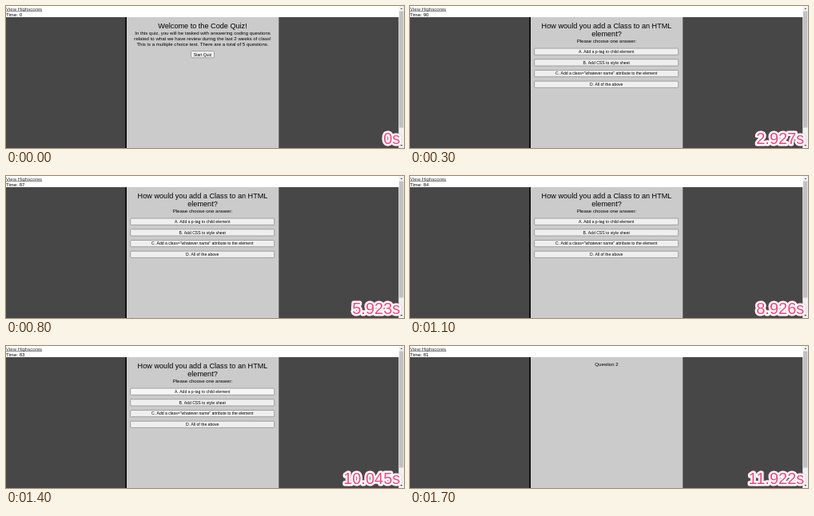
These frames come from a looping animation (498 px wide and 178 px high, 1800 ms). An HTML page with a canvas:

```html
<!DOCTYPE html>
<html lang="en">
<head>
<meta charset="utf-8">
<title>Code Quiz</title>
<style>
html, body { margin: 0; width: 100%; height: 100%; overflow: hidden; background: #fff; }
canvas { display: block; width: 498px; height: 178px; }
</style>
</head>
<body>
<canvas id="stage" width="498" height="178"></canvas>
<script>
const ctx = document.getElementById('stage').getContext('2d');
const FONT = '"Liberation Sans", Arial, sans-serif';
const BODY = 6.09, HEADING = BODY * 1.5, BUTTON = 5.08, CENTER = 246;
const FILL = { idle: '#efefef', hover: '#e3e3e3', active: '#f6f6f6' };
const STEP = 100;

// Each step: stopwatch seconds, countdown, page, pointer state of the main button
const steps = [
  ['0', 0, 'intro', 'idle'],
  ['1.125', 0, 'intro', 'hover'],
  ['1.925', 0, 'question', 'idle'],
  ['2.927', 90, 'question', 'idle'],
  ['3.924', 89, 'question', 'idle'],
  ['4.325', 89, 'question', 'hover'],
  ['4.922', 88, 'question', 'hover'],
  ['5.125', 88, 'question', 'idle'],
  ['5.923', 87, 'question', 'idle'],
  ['6.924', 86, 'question', 'idle'],
  ['7.925', 85, 'question', 'idle'],
  ['8.926', 84, 'question', 'idle'],
  ['9.525', 84, 'question', 'hover'],
  ['9.925', 83, 'question', 'hover'],
  ['10.045', 83, 'question', 'active'],
  ['10.125', 83, 'next', 'idle'],
  ['10.925', 82, 'next', 'idle'],
  ['11.922', 81, 'next', 'idle']
];

const answers = [
  'A. Add a p-tag to child element',
  'B. Add CSS to style sheet',
  'C. Add a class="whatever name" attribute to the element',
  'D. All of the above'
];

function rect(x, y, w, h, color) {
  ctx.fillStyle = color;
  ctx.fillRect(x, y, w, h);
}

function text(str, x, y, size, align = 'center', color = '#000') {
  ctx.font = `${size}px ${FONT}`;
  ctx.textAlign = align;
  ctx.fillStyle = color;
  ctx.fillText(str, x, y);
}

function button(label, x, y, w, state) {
  ctx.beginPath();
  ctx.roundRect(x, y, w, 8.2, 1);
  ctx.fillStyle = FILL[state];
  ctx.fill();
  ctx.lineWidth = 0.6;
  ctx.strokeStyle = state === 'hover' ? '#4f4f4f' : '#767676';
  ctx.stroke();
  text(label, x + w / 2, y + 5.9, BUTTON);
}

const pages = {
  intro(state) {
    text('Welcome to the Code Quiz!', CENTER, 27.9, HEADING);
    [
      'In this quiz, you will be tasked with answering coding questions',
      'related to what we have review during the last 2 weeks of class!',
      'This is a multiple choice test. There are a total of 5 questions.'
    ].forEach((line, i) => text(line, CENTER, 35.8 + i * 7, BODY));
    button('Start Quiz', 231.5, 56.6, 29, state);
  },
  question(state) {
    text('How would you add a Class to an HTML', CENTER, 27.9, HEADING);
    text('element?', CENTER, 38.3, HEADING);
    text('Please choose one answer:', CENTER, 46.2, BODY);
    answers.forEach((label, i) =>
      button(label, 155.7, 53.1 + i * 13.7, 180, i === 0 ? state : 'idle'));
  },
  next() {
    text('Question 2', CENTER, 25.2, BODY);
  }
};

function arrow(y, dir) {
  ctx.beginPath();
  ctx.moveTo(493.3, y);
  ctx.lineTo(496.3, y);
  ctx.lineTo(494.8, y + 1.7 * dir);
  ctx.fillStyle = '#505050';
  ctx.fill();
}

function stopwatch(seconds) {
  const label = seconds + 's', x = 493.3, y = 173;
  ctx.font = `20px ${FONT}`;
  ctx.textAlign = 'right';
  ctx.lineJoin = 'round';
  ctx.lineWidth = 5;
  ctx.strokeStyle = '#fff';
  ctx.save();
  ctx.shadowColor = 'rgba(240, 80, 130, 0.5)';
  ctx.shadowBlur = 2;
  ctx.strokeText(label, x, y);
  ctx.restore();
  text(label, x, y, 20, 'right', '#f4487f');
}

function draw([seconds, countdown, page, state]) {
  rect(0, 0, 498, 178, '#fff');
  rect(0, 14, 491.5, 164, '#474747');
  rect(149.3, 14, 2, 164, '#050505');
  rect(151, 14, 190.3, 164, '#cbcbcb');

  text('View Highscores', 0, 5.5, BODY, 'left', '#333');
  rect(0, 6.1, 45.3, 0.6, '#444');
  text('Time: ' + countdown, 0, 12.5, BODY, 'left');
  pages[page](state);

  rect(491.5, 0, 6.5, 178, '#f1f1f1');
  rect(492.1, 6.5, 5.2, 146, '#c1c1c1');
  arrow(4.1, -1);
  arrow(174, 1);
  stopwatch(seconds);
}

function tick() {
  draw(steps[Math.floor(performance.now() / STEP) % steps.length]);
  requestAnimationFrame(tick);
}
tick();
</script>
</body>
</html>
```
